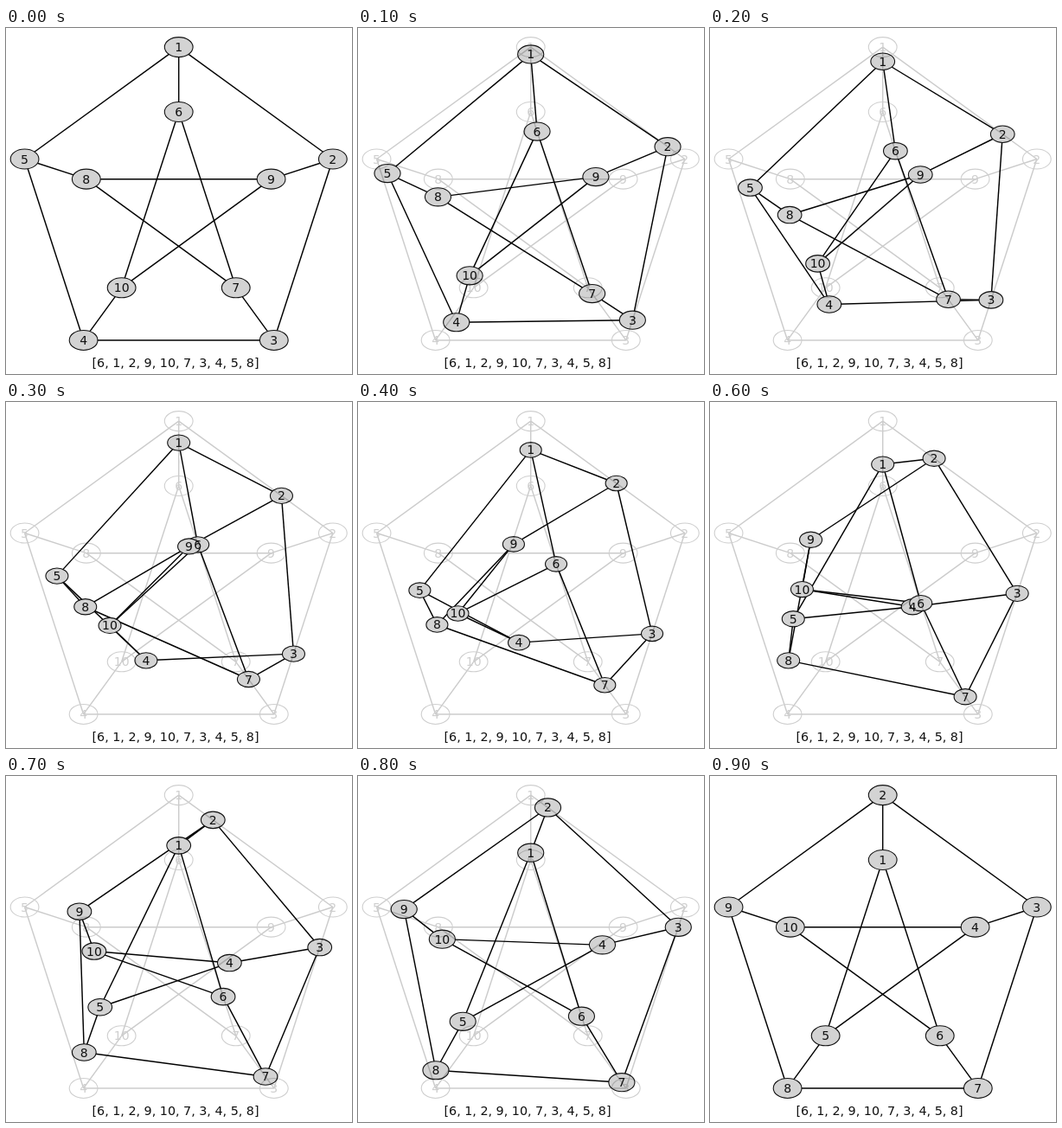
Write an HTML page that moves like this. It is 400 by 400 pixels and loops after 1 s.

```html
<!DOCTYPE html>
<html lang="en">
<head>
<meta charset="utf-8">
<title>Graph automorphism</title>
<style>
  html, body { margin: 0; width: 100%; height: 100%; overflow: hidden; background: #fff; }
  svg { display: block; width: 100vw; height: 100vh; }
  text { font-family: "DejaVu Sans", sans-serif; font-size: 14px; text-anchor: middle; fill: #111; }
  line { stroke: #000; stroke-width: 1.45; }
  ellipse { fill: #d3d3d3; stroke: #111; stroke-width: 1.1; }
  .ghost { opacity: 0.2; }
  .ghost ellipse { fill: none; }
  .caption { font-size: 14.3px; }
</style>
</head>
<body>
<svg viewBox="0 0 400 400">
  <g class="graph"></g>
  <g class="ghost"></g>
  <text class="caption" x="196" y="392"></text>
</svg>
<script>
const STEP = 100, STEPS = 10;
const CX = 199.7, CY = 209.4, OUTER = 187.3, INNER = OUTER * 0.6;
const RX = 16.4, RY = 11.5, SHRINK = 0.24;
const perm = [6, 1, 2, 9, 10, 7, 3, 4, 5, 8];

// Petersen graph: an outer ring 0-4 and an inner star 5-9.
const home = [], edges = [];
for (let i = 0; i < 5; i++) {
  const next = (i + 1) % 5, spoke = (2 * i) % 5;
  home[i] = onCircle(OUTER, i);
  home[i + 5] = onCircle(INNER, spoke);
  edges.push([i, next], [i + 5, next + 5], [spoke, i + 5]);
}

function onCircle(radius, fifth) {
  const angle = fifth * Math.PI * 2 / 5;
  return [CX + radius * Math.sin(angle), CY - radius * Math.cos(angle)];
}

function add(parent, tag) {
  const el = document.createElementNS("http://www.w3.org/2000/svg", tag);
  parent.appendChild(el);
  return el;
}

function set(el, attrs) {
  for (const name in attrs) el.setAttribute(name, attrs[name]);
}

function makeGraph(group) {
  const lines = edges.map(() => add(group, "line"));
  const ovals = home.map(() => add(group, "ellipse"));
  const labels = home.map(() => add(group, "text"));
  labels.forEach((label, i) => { label.textContent = i + 1; });
  return (points, scale) => {
    lines.forEach((line, i) => {
      const [a, b] = edges[i].map(n => points[n]);
      set(line, { x1: a[0], y1: a[1], x2: b[0], y2: b[1] });
    });
    points.forEach(([x, y], i) => {
      set(ovals[i], { cx: x, cy: y, rx: RX * scale, ry: RY * scale });
      set(labels[i], { x, y: y + 5 });
    });
  };
}

const ghost = document.querySelector(".ghost");
const drawGraph = makeGraph(document.querySelector(".graph"));
makeGraph(ghost)(home, 1);
document.querySelector(".caption").textContent = "[" + perm.join(", ") + "]";

// Each vertex slides straight to its image, shrinking halfway.
function pose(t) {
  const points = home.map(([x, y], i) => {
    const [tx, ty] = home[perm[i] - 1];
    return [x + (tx - x) * t, y + (ty - y) * t];
  });
  drawGraph(points, 1 - SHRINK * Math.sin(Math.PI * t));
  ghost.style.display = t > 0 && t < 1 ? "" : "none";
}

const start = performance.now();
function tick(now) {
  const step = Math.floor(Math.max(0, now - start) / STEP) % STEPS;
  pose(step / (STEPS - 1));
  requestAnimationFrame(tick);
}
pose(0);
requestAnimationFrame(tick);
</script>
</body>
</html>
```
